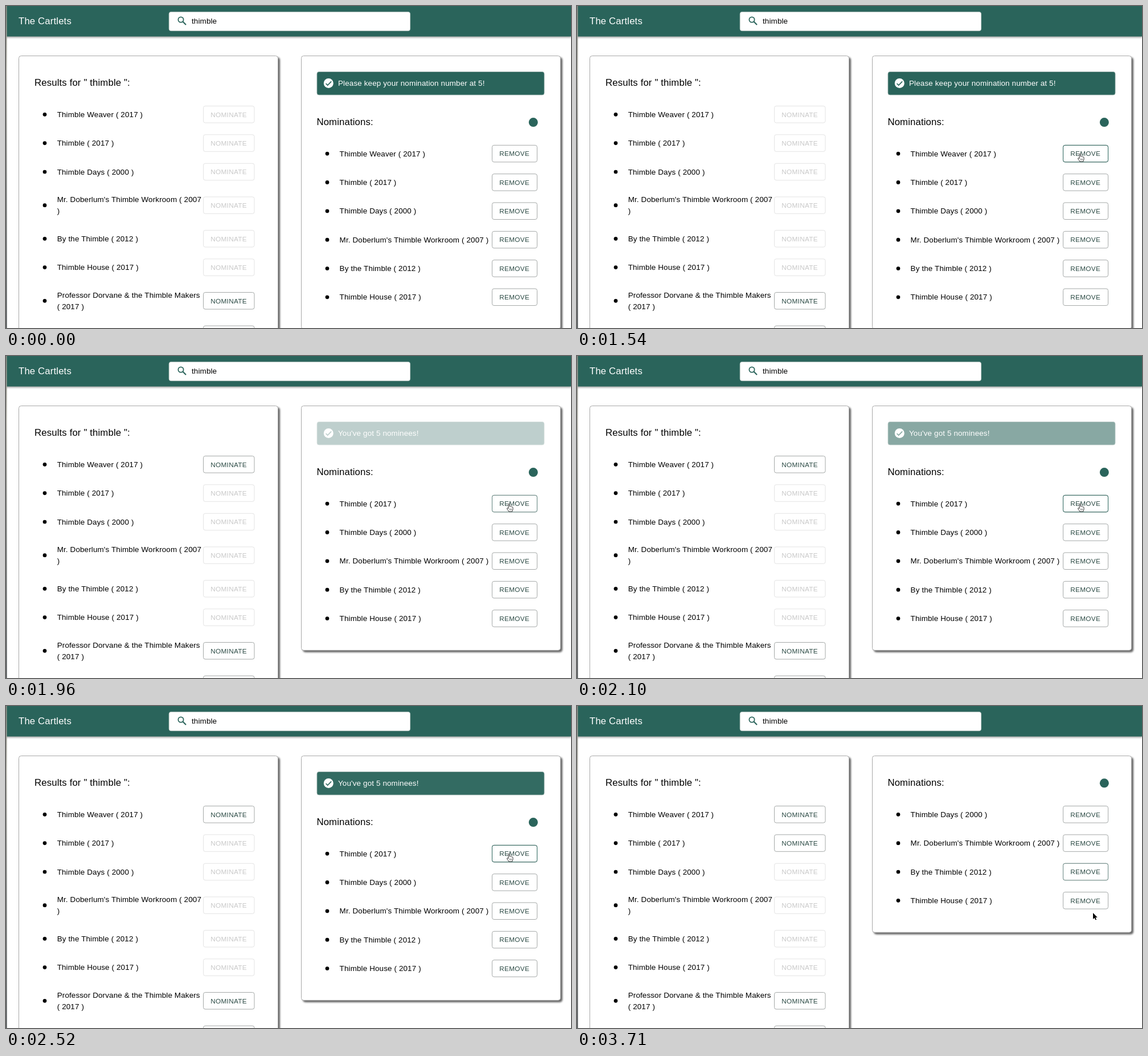
Recreate the animation shown at these times as an HTML page. Size 992 px wide and 565 px high, loop 3780 ms.

```html
<!DOCTYPE html>
<html lang="en">
<head>
<meta charset="utf-8">
<title>Nominations</title>
<style>
  html, body { margin: 0; width: 100%; height: 100%; overflow: hidden; background: #fff; }
  svg { display: block; width: 992px; height: 565px; }
  text { font: 13.44px "Liberation Sans", Arial, sans-serif; letter-spacing: .126px; fill: #000; }
  .title { font-size: 16.8px; }
  .light { fill: #fff; }
  .label { font-size: 11.76px; letter-spacing: .336px; fill: #2b4a44; }
  .off { fill: #00000038; }
  .card { fill: #fff; stroke: #a8a8a8; filter: drop-shadow(3px 3px 1.5px #0009); }
  .bar { fill: #2a645b; filter: drop-shadow(0 2px 1.5px #0005); }
</style>
</head>
<body>
<svg id="stage" viewBox="0 0 992 565">
  <defs>
    <linearGradient id="edge" x2="0" y2="1">
      <stop offset="0" stop-color="#8b8d84"/>
      <stop offset=".2" stop-color="#b3b2aa"/>
      <stop offset=".6" stop-color="#777a78"/>
      <stop offset="1" stop-color="#4c5052"/>
    </linearGradient>
  </defs>
  <rect class="bar" width="992" height="53.5"/>
  <rect x="286.2" y="10.4" width="423.4" height="33.2" rx="3.5" fill="#fff" stroke="#c4cecb" stroke-width=".8"/>
  <g fill="none" stroke="#2a645b" stroke-width="1.8">
    <circle cx="307" cy="24" r="4.6"/>
    <path d="M310.3 27.3L316 33" stroke-width="2.1"/>
  </g>
  <text class="title light" x="22" y="32">The Cartlets</text>
  <text x="326" y="31">thimble</text>
  <g id="results"></g>
  <g id="nominations"></g>
  <rect width="1.6" height="565" fill="url(#edge)"/>
  <g id="pointer"></g>
</svg>
<script>
const LOOP = 3780, STEP = 70, ROW = 50.35;
const FIRST_REMOVED = 1820, SECOND_REMOVED = 2730;
const GREEN = '#2a645b';

// Each film: the row's centre in the results list, then its lines there.
const films = [
  [190.3, 'Thimble Weaver ( 2017 )'],
  [240.6, 'Thimble ( 2017 )'],
  [291, 'Thimble Days ( 2000 )'],
  [349.7, "Mr. Doberlum's Thimble Workroom ( 2007", ')'],
  [408.3, 'By the Thimble ( 2012 )'],
  [458.6, 'Thimble House ( 2017 )'],
  [517.3, 'Professor Dorvane &amp; the Thimble Makers', '( 2017 )'],
  [576, '']
];

// Pointer path: time, x, y
const path = [
  [70, 917, 550], [420, 889, 455], [490, 889, 455], [910, 883, 281],
  [1050, 883, 259], [3360, 883, 259], [3430, 883, 264],
  [3570, 884, 301], [3640, 884, 301], [3710, 906, 363]
];

const byId = id => document.getElementById(id);
const clamp = v => Math.max(0, Math.min(1, v));
const mix = (a, b, p) => a + (b - a) * p;

// The right-hand list sits lower while there is room for an alert above it.
const listShift = removed => removed < 2 ? 68.8 : 0;

const text = (x, y, content, cls = '') => `<text class="${cls}" x="${x}" y="${y}">${content}</text>`;
const bullet = (x, y) => `<circle cx="${x}" cy="${y}" r="3.35"/>`;
const card = (x, height) =>
  `<rect class="card" x="${x + .5}" y="87.5" width="455" height="${height}" rx="4"/>`;

function button(x, y, width, label, enabled = true, hover = 0) {
  const box = `x="${x + .5}" y="${y - 14.8}" width="${width}" height="29.5" rx="3.4" fill="none"`;
  return `<rect ${box} stroke="${enabled ? '#a5a9a8' : '#0000001c'}"/>` +
    (hover ? `<rect ${box} stroke="${GREEN}" stroke-opacity="${hover}"/>` : '') +
    text(x + 13.2, y + 4.2, label, enabled ? 'label' : 'label off');
}

function drawResults(removed) {
  let out = card(22, 520) + text(50, 140, 'Results for " thimble ":', 'title');
  films.forEach(([y, ...lines], i) => {
    const top = y + 4.6 - (lines.length - 1) * 10.1;
    out += bullet(68, y) + lines.map((line, n) => text(89.7, top + n * 20.2, line)).join('');
    out += button(346, y, 89.5, 'NOMINATE', i < removed || i > 5);
  });
  return out;
}

function drawAlert(message, opacity) {
  return `<g opacity="${opacity}">
    <rect x="546" y="115.5" width="399" height="40.5" rx="3.5" fill="${GREEN}" stroke="#8fa8a3" stroke-width=".8"/>
    <circle cx="566.3" cy="135.6" r="8.5" fill="#fff"/>
    <path d="M561.6 136L564.7 139.1 571.2 132.4" fill="none" stroke="${GREEN}" stroke-width="1.7"/>
    ${text(583, 140.2, message, 'light')}</g>`;
}

function drawNominations(t, removed) {
  const shift = listShift(removed);
  let out = card(518, 108.3 + shift + (6 - removed) * ROW);
  if (removed === 0) out += drawAlert('Please keep your nomination number at 5!', 1);
  if (removed === 1) {
    const fade = 1 - (1 - clamp((t - FIRST_REMOVED - 10) / 1000)) ** 2.6;
    out += drawAlert("You've got 5 nominees!", fade);
  }
  out += text(545.4, 140.2 + shift, 'Nominations:', 'title');
  out += `<circle cx="925.8" cy="${135.3 + shift}" r="8" fill="${GREEN}"/>`;

  const hoveredRow = removed < 2 ? 0 : 2;
  const hover = [clamp((t - 1050) / 250), clamp((t - FIRST_REMOVED) / 250), t >= 3710 ? .5 : 0][removed];
  films.slice(removed, 6).forEach(([, ...lines], i) => {
    const y = 190.3 + shift + i * ROW;
    out += bullet(564, y) + text(585.6, y + 4.6, lines.join(' '));
    out += button(853, y, 79, 'REMOVE', true, i === hoveredRow ? hover : 0);
  });
  return out;
}

const ARROW = `<path d="M0 0V11L2.6 8.7 4.4 12.6 6.1 11.8 4.4 8.1H7.7Z" stroke="#fff" stroke-width="1.2" paint-order="stroke"/>`;
const HAND = `<path d="M-.8 8.6V.8Q.2-.8 1.3.8V5Q2.6 4 3.3 5.4 4.6 4.6 5.2 5.9 7 5.4 7 7.4V10Q6.6 12 5.6 14H0Q-1.4 11.8-3 9.8-4 7.4-2.2 7.5Z" fill="#fff" stroke="#222" stroke-width=".9" stroke-linejoin="round"/>
  <path d="M1.4 8.8V11.6M3 8.8V11.6M4.6 8.8V11.6" stroke="#333" stroke-width=".6"/>`;

function drawPointer(t, removed) {
  if (t < path[0][0]) return '';
  const next = path.findIndex(point => point[0] > t);
  const b = path.at(next), a = next < 0 ? b : path[next - 1];
  const p = next < 0 ? 0 : (t - a[0]) / (b[0] - a[0]);
  const x = mix(a[1], b[1], p), y = mix(a[2], b[2], p);

  const fromFirst = y - 190.3 - listShift(removed);
  const row = Math.round(fromFirst / ROW);
  const overButton = row >= 0 && row < 6 - removed && Math.abs(fromFirst - row * ROW) < 15;
  return `<g transform="translate(${x} ${y})">${overButton ? HAND : ARROW}</g>`;
}

let lastStep = -1;
function frame() {
  const t = Math.floor(performance.now() % LOOP / STEP) * STEP;
  if (t !== lastStep) {
    lastStep = t;
    const removed = (t >= FIRST_REMOVED) + (t >= SECOND_REMOVED);
    byId('results').innerHTML = drawResults(removed);
    byId('nominations').innerHTML = drawNominations(t, removed);
    byId('pointer').innerHTML = drawPointer(t, removed);
  }
  requestAnimationFrame(frame);
}
frame();
</script>
</body>
</html>
```
